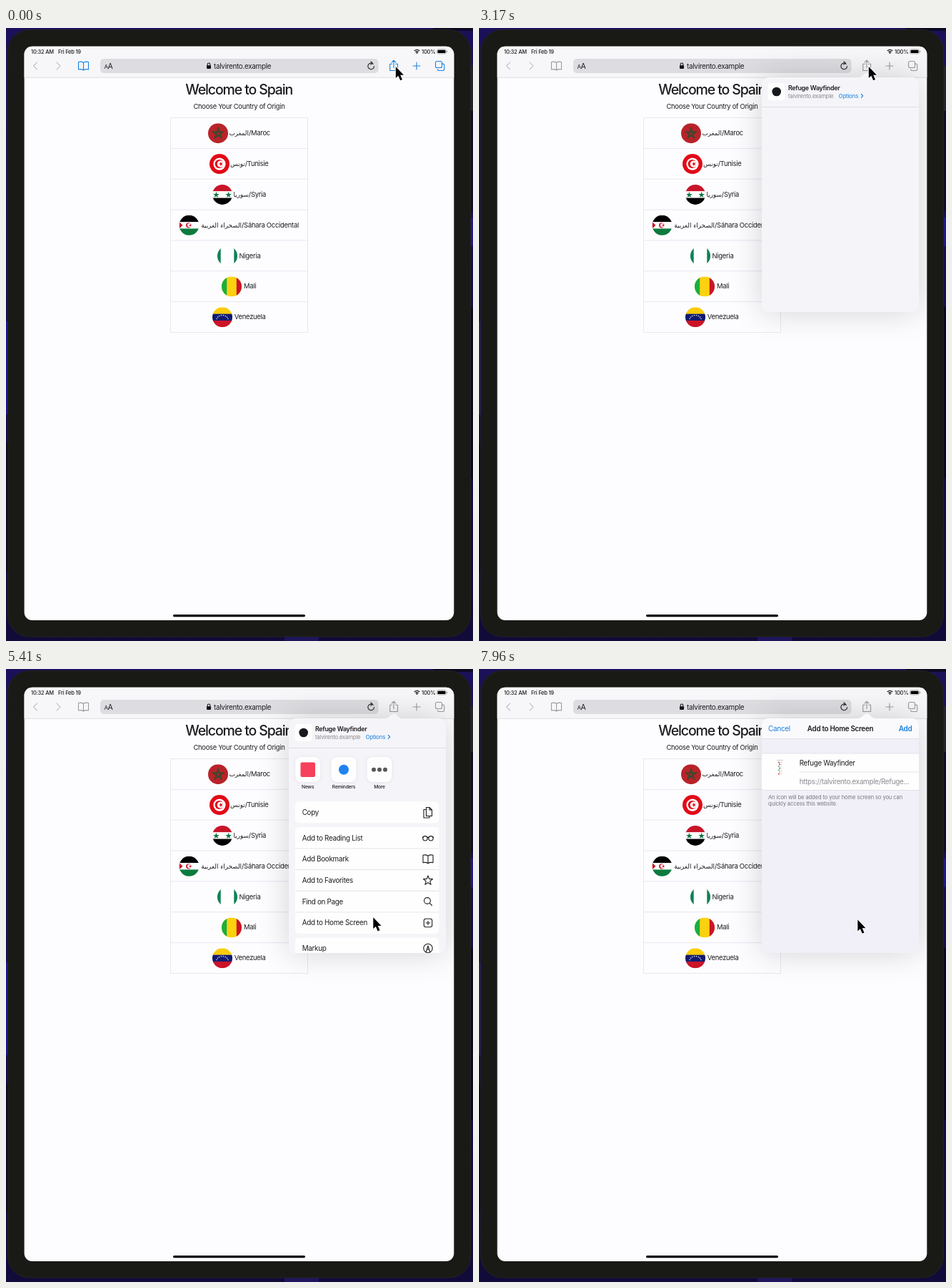
Write an HTML page that moves like this. It is 654x857 px and loops after 8 s.

```html
<!DOCTYPE html>
<html lang="en">
<head>
<meta charset="utf-8">
<style>
html, body { margin: 0; width: 100%; height: 100%; overflow: hidden; background: #130d47; }
svg { display: block; width: 100vw; height: 100vh; }
text { font-family: Inter, Roboto, sans-serif; letter-spacing: -.03em; fill: #1d1d20; }
text.ar { font-family: "DejaVu Sans", sans-serif; letter-spacing: 0; }
text.title { letter-spacing: -.058em; }
text.note { letter-spacing: -.01em; fill: #77777d; }
text.link { fill: #1a80df; }
text.dim { fill: #8b8b91; }
.line { fill: none; stroke-width: 1.1; stroke-linecap: round; stroke-linejoin: round; }
</style>
</head>
<body>
<svg id="stage" viewBox="0 0 654 857"></svg>
<script>
const LOOP = 8000, BLUE = '#1a80df', DOMAIN = 'talvirento.example', APP = 'Refuge Wayfinder';

const text = (x, y, str, size, attrs = '') =>
  `<text x="${x}" y="${y}" font-size="${size}" ${attrs}>${str}</text>`;
const rect = (x, y, w, h, fill, r = 0, attrs = '') =>
  `<rect x="${x}" y="${y}" width="${w}" height="${h}" rx="${r}" fill="${fill}" ${attrs}/>`;
const circle = (x, y, r, fill, attrs = '') =>
  `<circle cx="${x}" cy="${y}" r="${r}" fill="${fill}" ${attrs}/>`;
const path = (d, attrs = '') => `<path d="${d}" ${attrs}/>`;
const group = (attrs, ...parts) => `<g ${attrs}>${parts.join('')}</g>`;

function star(x, y, r, attrs, turn = -90) {
  const pts = [0, 2, 4, 1, 3].map(i => {
    const a = (turn + i * 72) * Math.PI / 180;
    return `${(x + r * Math.cos(a)).toFixed(2)},${(y + r * Math.sin(a)).toFixed(2)}`;
  });
  return `<polygon points="${pts.join(' ')}" ${attrs}/>`;
}

const crescent = (x, y, r, color, back) =>
  circle(x, y, r, color) + circle(x + r * .3, y, r * .78, back);
const bandsH = (...colors) => colors.map((c, i) => rect(-14, -14 + i * 28 / 3, 28, 9.5, c)).join('');
const bandsV = (half, a, b, c) =>
  rect(-14, -14, 28, 28, b) + rect(-14, -14, 14 - half, 28, a) + rect(half, -14, 14 - half, 28, c);

const flags = {
  morocco: rect(-14, -14, 28, 28, '#b92329') +
    star(0, .3, 7.6, 'fill="none" stroke="#344a2d" stroke-width="1.5"'),
  tunisia: rect(-14, -14, 28, 28, '#e20a17') + circle(0, 0, 8.6, '#fff') +
    crescent(-.4, 0, 6, '#e20a17', '#fff') + star(2, 0, 3.3, 'fill="#e20a17"', 180),
  syria: bandsH('#c9152a', '#fff', '#000') +
    star(-8.6, .4, 4.6, 'fill="#0b7440"') + star(8.6, .4, 4.6, 'fill="#0b7440"'),
  sahara: bandsH('#000', '#fff', '#0c7a3e') + path('M-14-4.7-9 0-14 4.7Z', 'fill="#c9152a"') +
    crescent(-.8, 0, 3.6, '#c9152a', '#fff') + star(1.6, 0, 2.2, 'fill="#c9152a"'),
  nigeria: bandsV(9.3, '#0f8154', '#fff', '#0f8154'),
  mali: bandsV(6.8, '#1aae3c', '#fcd10f', '#cb1428'),
  venezuela: bandsH('#fccc08', '#101a70', '#cb1428') +
    [...Array(8)].map((_, i) => {
      const a = Math.PI * (1.1 + i * .8 / 7);
      return star(8.3 * Math.cos(a), 4.2 + 7 * Math.sin(a), 1.2, 'fill="#fff"');
    }).join('')
};

// flag, flag centre x, latin label, latin x, arabic label
const countries = [
  ['morocco', 297, '/Maroc', 340, 'المغرب'],
  ['tunisia', 299, '/Tunisie', 334.7, 'تونس'],
  ['syria', 303, '/Syria', 339.8, 'سوريا'],
  ['sahara', 256.5, '/Sáhara Occidental', 330, 'الصحراء الغربية'],
  ['nigeria', 310, 'Nigeria', 326.5],
  ['mali', 316, 'Mali', 333],
  ['venezuela', 303, 'Venezuela', 319.8]
];

const ROW = 42.86;
const page =
  text(326.2, 93, 'Welcome to Spain', 19.5, 'class="title" font-weight="500" text-anchor="middle"') +
  text(326.5, 112.5, 'Choose Your Country of Origin', 9.4, 'text-anchor="middle"') +
  rect(230.5, 125.5, 192, 300, 'none', 0, 'stroke="#e9e7ef"') +
  countries.map(([flag, fx, label, lx, arabic], i) => {
    const y = 147.2 + ROW * i;
    return (i ? path(`M231 ${125.5 + ROW * i}h191`, 'stroke="#e8e6f2"') : '') +
      group(`transform="translate(${fx} ${y})" clip-path="url(#disc)"`, flags[flag]) +
      text(lx, y + 2.9, label, 9.45) +
      (arabic ? text(lx, y + 2.9, arabic, 8.8, 'class="ar" text-anchor="end"') : '');
  }).join('');

const book = (x, y) => path(`M${x} ${y - 4.5}q-3-2-7-1v10.5q4-1 7 1 3-2 7-1v-10.5q-4-1-7 1v10.5`);
const plus = (x, y, r) => path(`M${x - r} ${y}h${2 * r}M${x} ${y - r}v${2 * r}`);

const statusBar =
  group('font-weight="500"',
    text(35, 35.5, '10:32 AM', 7.5), text(73, 35.5, 'Fri Feb 19', 7.5), text(582, 35.5, '100%', 7.6)) +
  group('fill="none" stroke="#111" stroke-width="1.3"',
    path('M571.8 32q3.7-3.2 7.4 0M573.5 33.8q2-1.6 4 0')) +
  circle(575.5, 35.2, .9, '#111') +
  rect(603.5, 29.8, 13, 6.2, 'none', 2, 'stroke="#999" stroke-width=".7"') +
  rect(604.5, 30.7, 11, 4.4, '#000', 1.2) + rect(617.3, 31.8, 1, 2.2, '#999', .5);

const toolbar =
  rect(25, 25, 603, 44, '#f7f7f9') + path('M25 69.3h603', 'stroke="#d9d9de" stroke-width=".8"') + statusBar +
  rect(132, 43, 389.5, 20, '#dddde1', 5) +
  text(137.5, 57, 'A', 8) + text(142.5, 57, 'A', 10.5) +
  rect(281, 52.2, 6, 4.8, '#111', 1) +
  path('M282.2 52.5v-1.7a1.8 1.8 0 0 1 3.6 0v1.7', 'class="line" stroke="#111"') +
  text(291, 56.5, DOMAIN, 9.9) +
  group('class="line" stroke="#222"',
    path('M514.2 50.3a4.3 4.3 0 1 0 1.3 3.2M511 46.8l2.3 2.3-2.5 2')) +
  group('class="line" stroke="#c3c3c8"', path('M43.5 48l-5 5 5 5M71 48l5 5-5 5')) +
  group('id="icons" class="line"',
    book(108.5, 53), plus(575, 53, 5),
    rect(601.5, 46.5, 9, 9, 'none', 2), path('M604.5 57.5v.3q0 1.7 1.7 1.7h5.8q1.7 0 1.7-1.7v-6q0-1.7-1.7-1.7h-.8'),
    group('id="share"', path('M540.5 50.3h-2.8v9.2h10.8v-9.2h-2.8M543 55.5v-10M540.2 48l2.8-2.8 2.8 2.8')));

const rowIcons = [
  path('M588.5 196.5h-3.5v11.5h8v-2.5M588.5 193.5h4.5l3.5 3.5v8.5h-8zM593 193.5v3.5h3.5'),
  circle(587, 236.8, 3.2, 'none'), circle(595, 236.8, 3.2, 'none'),
  path('M590 235.8q1-.8 2 0M583.8 236v-1.2M598.2 236v-1.2'),
  book(591, 265.7),
  path([...Array(10)].map((_, i) => {
    const a = (i * 36 - 90) * Math.PI / 180, r = i % 2 ? 2.9 : 6.9;
    return `${i ? 'L' : 'M'}${591 + r * Math.cos(a)} ${295.8 + r * Math.sin(a)}`;
  }).join('') + 'Z'),
  circle(590, 324, 4.4, 'none'), path('M593.3 327.3l3.2 3.2'),
  rect(585.3, 349.3, 11.4, 11.4, 'none', 2.4), plus(591, 355, 2.8),
  circle(591, 390.5, 6.2, 'none'), path('M588.3 395.5l2.7-8.5 2.7 8.5M589.5 392h3')
];

const tile = (x, label, ...art) =>
  rect(x - 17.5, 123.5, 35, 35, '#c9c9d2', 8, 'opacity=".45" filter="url(#soft)"') +
  rect(x - 17.5, 123, 35, 35, '#fefefe', 8) + art.join('') +
  text(x, 167.3, label, 6.7, 'font-weight="500" text-anchor="middle"');

const actions = ['Add to Reading List', 'Add Bookmark', 'Add to Favorites', 'Find on Page', 'Add to Home Screen'];
const menu =
  tile(422.7, 'News', rect(412.5, 130.5, 20.5, 20.5, '#f7405b', 2)) +
  tile(473, 'Reminders', circle(473, 140.7, 7, '#1f83ee')) +
  tile(523, 'More', ...[-8, 0, 8].map(d => circle(523 + d, 140.7, 3, '#58585b'))) +
  rect(405, 185.2, 201.5, 30, '#fefefe', 6) + text(414.7, 204, 'Copy', 9.85) +
  rect(405, 221, 201.5, 149, '#fefefe', 6) +
  actions.map((a, i) => text(414.7, 239.5 + i * 29.67, a, 9.85) +
    (i ? path(`M405 ${221.3 + i * 29.67}h201.5`, 'stroke="#dddde6" stroke-width=".8"') : '')).join('') +
  rect(405, 375.5, 201.5, 40, '#fefefe', 6) + text(414.7, 393.7, 'Markup', 9.85) +
  group('class="line" stroke="#1d1d20"', ...rowIcons);

const shareHeader =
  rect(404.5, 77, 24, 24, '#fefefe', 4) + circle(416.7, 89, 6.3, '#17191e') +
  text(433, 87, APP, 8.8, 'font-weight="600"') +
  text(433, 97.5, DOMAIN, 7.8, 'class="dim"') +
  text(503.5, 97.5, 'Options', 8, 'class="link"') +
  path('M535.3 92.5l2.4 2.4-2.4 2.4', `class="line" stroke="${BLUE}"`) +
  path('M396 110.5h220', 'stroke="#dcdce4"');

const rule = (x, y) => path(`M${x} ${y}H616`, 'stroke="#dcdce2" stroke-width=".8"');
const thumbnail = rect(417, 127, 9, .8, '#bbb') +
  ['#b92329', '#e20a17', '#58795f', '#444', '#0f8154', '#d7b53b', '#cb1428'].map((c, i) =>
    circle(420 + i % 2, 130.5 + i * 2.7, .9, c) + rect(422, 130.2 + i * 2.7, 2.5, .6, '#bbb')).join('');
const sheet =
  rect(396, 60, 220, 337, '#f1f0f8') + rect(396, 60, 220, 37.5, '#fafafc') + rule(396, 97.5) +
  text(405, 86.5, 'Cancel', 10, 'class="link"') +
  text(506, 86.5, 'Add to Home Screen', 9.85, 'font-weight="600" text-anchor="middle"') +
  text(606.5, 86.5, 'Add', 10, 'class="link" font-weight="600" text-anchor="end"') +
  rect(396, 118, 220, 51.5, '#fefefe') + rule(396, 118) + rule(448.5, 144) + rule(396, 169.5) +
  thumbnail +
  text(448.7, 134.5, APP, 9.75) +
  text(448.7, 160.5, `https://${DOMAIN}/Refuge...`, 9.85, 'class="dim"') +
  text(405, 181.8, 'An icon will be added to your home screen so you can', 7.5, 'class="note"') +
  text(405, 191, 'quickly access this website.', 7.5, 'class="note"');

const PANEL = 'M405 69H531Q535 69 539 64.5Q543 60.5 547 64.5Q551 69 555 69H607A9 9 0 0 1 616 78V388A9 9 0 0 1 607 397H405A9 9 0 0 1 396 388V78A9 9 0 0 1 405 69Z';

const room =
  rect(0, 0, 654, 857, 'url(#night)') + rect(598, 0, 56, 4, '#0c0a22') +
  rect(0, 410, 5, 130, '#21178c') + rect(0, 580, 5, 180, '#0a071f') +
  rect(648, 52, 6, 64, '#24232e') + rect(648, 116, 6, 140, '#0e0b2a') +
  rect(648, 265, 6, 40, '#21178c') + rect(648, 390, 6, 240, '#0b081f') +
  rect(390, 850, 48, 7, '#1e155e');

document.getElementById('stage').innerHTML = `
  <defs>
    <linearGradient id="night" x2="0" y2="1">
      <stop stop-color="#1a115a"/><stop offset="1" stop-color="#110b3a"/>
    </linearGradient>
    <clipPath id="disc"><circle r="14"/></clipPath>
    <clipPath id="screen"><rect x="25.6" y="25.7" width="601.7" height="802.2" rx="11"/></clipPath>
    <clipPath id="panel"><path d="${PANEL}"/></clipPath>
    <filter id="blur" x="-50%" y="-50%" width="200%" height="200%"><feGaussianBlur stdDeviation="23"/></filter>
    <filter id="soft" x="-50%" y="-50%" width="200%" height="200%"><feGaussianBlur stdDeviation="2.5"/></filter>
  </defs>` +
  room +
  rect(2.5, 2.5, 648, 848.5, '#191a16', 30, 'stroke="#22221f"') +
  group('clip-path="url(#screen)"',
    rect(25, 25, 603, 804, '#fdfdff'), toolbar, page, rect(234, 820, 185, 3.2, '#000', 1.6),
    group('id="popover"',
      path(PANEL, 'opacity=".17" filter="url(#blur)"'),
      group('clip-path="url(#panel)"',
        rect(396, 60, 220, 337, '#f5f5f9'), shareHeader,
        group('id="menu"', menu), group('id="sheet"', sheet)))) +
  path('M0 0V16L3.5 12.7 6.4 19.2 9.2 18 6.4 11.7H11.2Z',
    'id="cursor" fill="#000" stroke="#fff" stroke-width="2" stroke-linejoin="round" paint-order="stroke"');

const [icons, share, popover, menuBox, sheetBox, cursor] =
  ['icons', 'share', 'popover', 'menu', 'sheet', 'cursor'].map(id => document.getElementById(id));

const ramp = (t, from, to) => {
  const k = Math.min(1, Math.max(0, (t - from) / (to - from)));
  return k * k * (3 - 2 * k);
};

function draw(t) {
  const open = ramp(t, 1850, 2100);
  popover.style.opacity = open;
  icons.style.stroke = `color-mix(in srgb, #9a9a9f ${open * 100}%, ${BLUE})`;
  share.style.opacity = t >= 1660 && t < 1850 ? .2 : 1;
  menuBox.style.opacity = ramp(t, 3550, 3700);
  sheetBox.style.opacity = ramp(t, 7800, 7950);

  const go = ramp(t, 4400, 5300), nudge = ramp(t, 5900, 6600);
  cursor.setAttribute('transform',
    `translate(${545.8 - 31.5 * go + 16 * nudge} ${54 + 293.3 * go + 3.2 * nudge})`);
}

function tick(now) {
  draw(now % LOOP);
  requestAnimationFrame(tick);
}
draw(0);
requestAnimationFrame(tick);
</script>
</body>
</html>
```
